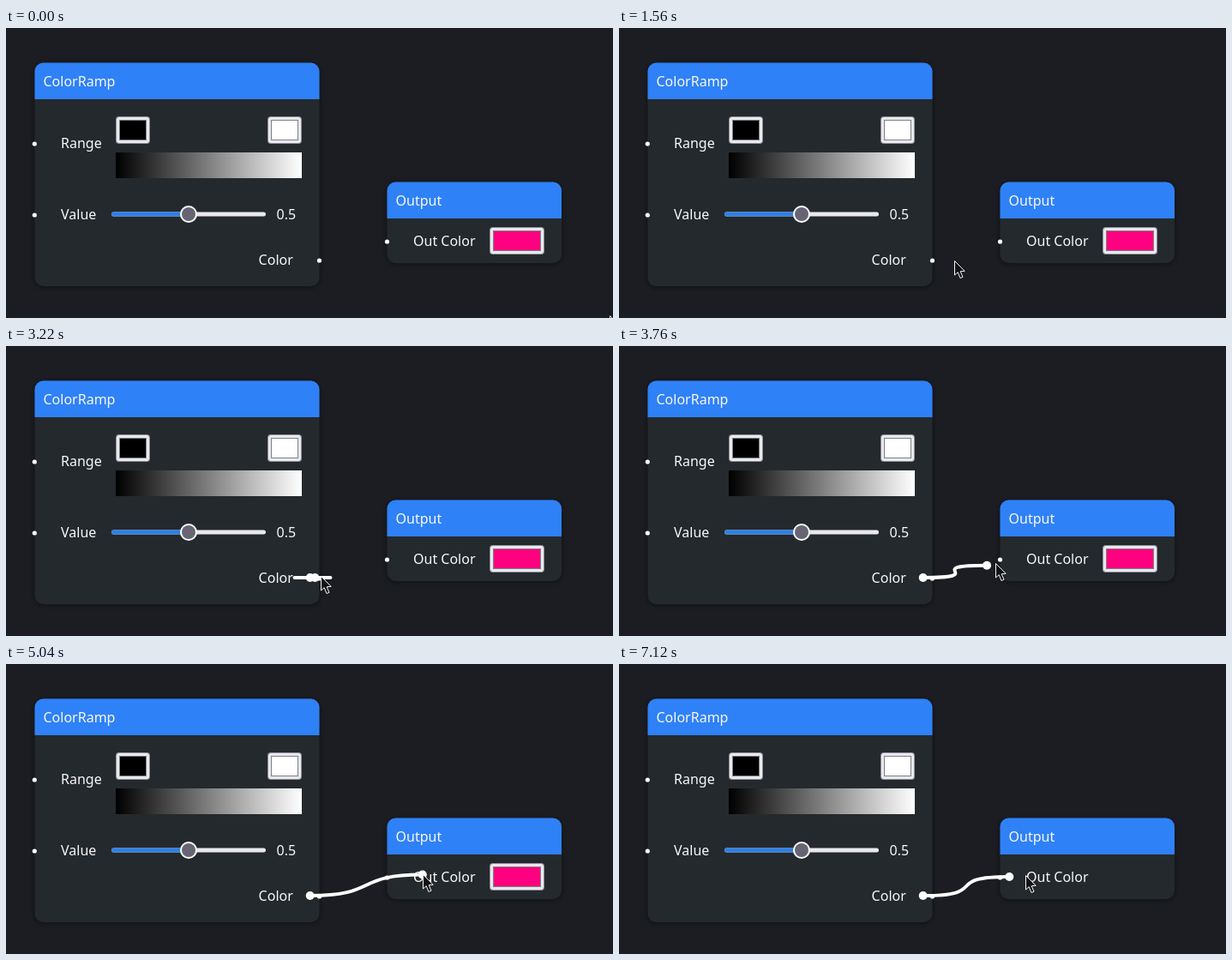
These frames come from a looping animation (708x338 px, 8680 ms). An HTML page with a canvas:

```html
<!DOCTYPE html>
<html lang="en">
<head>
<meta charset="utf-8">
<title>Node editor</title>
<style>
  html, body { margin: 0; width: 100%; height: 100%; overflow: hidden; background: #1c1d22; }
  canvas { display: block; }
</style>
</head>
<body>
<canvas id="stage" width="708" height="338"></canvas>
<script>
const ctx = document.getElementById('stage').getContext('2d');
const LOOP = 8680;
const GRAB = 2680;
const DROP = 5760;
const LAG = 70;
const BLUE = '#2f81f7';
const LIGHT = '#e9e9ed';

const easeOut = k => 1 - (1 - k) ** 2;
const easeInOut = k => k * k * (3 - 2 * k);

// Pointer gestures in order; it rests between them
const home = { x: 704, y: 335 };
const moves = [
  { from: 540, to: 990, x: 423, y: 275, ease: easeOut },
  { from: 1100, to: 1420, x: 399, y: 271, ease: easeOut },
  { from: 1500, to: 2240, x: 351, y: 271, ease: easeOut },
  { from: 2930, to: 4300, x: 485, y: 243, ease: easeInOut },
  { from: 4900, to: 5040, x: 486, y: 245, ease: easeOut },
  { from: 6020, to: 6300, x: 483, y: 246, ease: easeOut },
  { from: 6980, to: 7120, x: 474, y: 246, ease: easeOut }
];

function pointerAt(t) {
  let { x, y } = home;
  for (const move of moves) {
    const k = move.ease(Math.min(1, Math.max(0, (t - move.from) / (move.to - move.from))));
    x += (move.x - x) * k;
    y += (move.y - y) * k;
  }
  return { x, y };
}

function box(x, y, w, h, radius, fill) {
  ctx.fillStyle = fill;
  ctx.beginPath();
  ctx.roundRect(x, y, w, h, radius);
  ctx.fill();
}

function dot(x, y, r, fill = '#fff') {
  ctx.fillStyle = fill;
  ctx.beginPath();
  ctx.arc(x, y, r, 0, Math.PI * 2);
  ctx.fill();
}

const port = (x, y) => dot(x, y, 2.6);

function label(text, x, baseline) {
  ctx.fillStyle = '#f8f8f8';
  ctx.fillText(text, x, baseline);
}

function card(title, x, y, w, h) {
  ctx.save();
  ctx.shadowColor = 'rgba(0, 0, 0, 0.5)';
  ctx.shadowBlur = 6;
  ctx.shadowOffsetY = 1;
  box(x, y, w, h, 10, '#24292d');
  ctx.restore();
  box(x, y, w, 42.5, [10, 10, 0, 0], BLUE);
  label(title, x + 10, y + 27.5);
}

function swatch(x, y, w, color) {
  box(x, y, w, 32, 4, '#8f8f9d');
  box(x + 1, y + 1, w - 2, 30, 3, LIGHT);
  box(x + 4, y + 4, w - 8, 24, 0, '#808080');
  box(x + 5, y + 5, w - 10, 22, 0, color);
}

function slider(x, y, w, value) {
  box(x, y - 2.5, w, 5, 2.5, LIGHT);
  box(x, y - 2.5, w * value, 5, 2.5, '#3080e4');
  dot(x + w * value, y, 10);
  dot(x + w * value, y, 8, '#676474');
}

function drawRamp() {
  card('ColorRamp', 33.5, 40.5, 332, 260.5);
  label('Range', 64, 140);
  swatch(128, 103, 40, '#000');
  swatch(305, 103, 40, '#fff');
  const ramp = ctx.createLinearGradient(128, 0, 345, 0);
  ramp.addColorStop(0, '#000');
  ramp.addColorStop(1, '#fff');
  box(128, 145, 217, 30, 0, ramp);
  label('Value', 64, 223);
  slider(123, 217, 180, 0.5);
  label('0.5', 315.5, 223);
  label('Color', 294.6, 276);
  port(33.3, 135);
  port(33.3, 218);
  port(365.5, 271);
}

function drawOutput(connected) {
  card('Output', 444.5, 179.5, 203.5, 94.5);
  label('Out Color', 475, 254);
  if (!connected) swatch(564, 232, 64, '#ff0080');
  port(444.5, 249);
}

function drawWire(end) {
  const start = { x: 354.7, y: 270 };
  const reach = 80;
  const bend = end.x < start.x ? reach : -reach;
  ctx.strokeStyle = '#fff';
  ctx.lineWidth = 4;
  ctx.beginPath();
  ctx.moveTo(start.x, start.y);
  ctx.bezierCurveTo(start.x + reach, start.y, end.x + bend, end.y, end.x, end.y);
  ctx.stroke();
  dot(start.x, start.y, 5);
  dot(end.x, end.y, 5);
}

function drawPointer({ x, y }) {
  ctx.save();
  ctx.translate(Math.round(x) + 0.5, Math.round(y) + 0.5);
  ctx.fillStyle = '#111214';
  ctx.strokeStyle = '#f4f4f4';
  ctx.lineWidth = 1;
  const arrow = new Path2D('M0 0V16.5L3.7 13.2 6.5 20 9.5 18.7 6.7 12.2 11.7 11.8Z');
  ctx.fill(arrow);
  ctx.stroke(arrow);
  ctx.restore();
}

function draw(t) {
  ctx.fillStyle = '#1c1d22';
  ctx.fillRect(0, 0, 708, 338);
  ctx.font = '16px "Noto Sans", sans-serif';
  const connected = t >= DROP;
  drawRamp();
  drawOutput(connected);
  if (connected) {
    drawWire({ x: 455.3, y: 248 });
  } else if (t >= GRAB) {
    // The loose end trails the pointer slightly
    const { x, y } = pointerAt(t - LAG);
    drawWire({ x, y: Math.min(y + 1, 270.5) });
  }
  drawPointer(pointerAt(t));
}

function tick() {
  draw(performance.now() % LOOP);
  requestAnimationFrame(tick);
}
tick();
</script>
</body>
</html>
```
